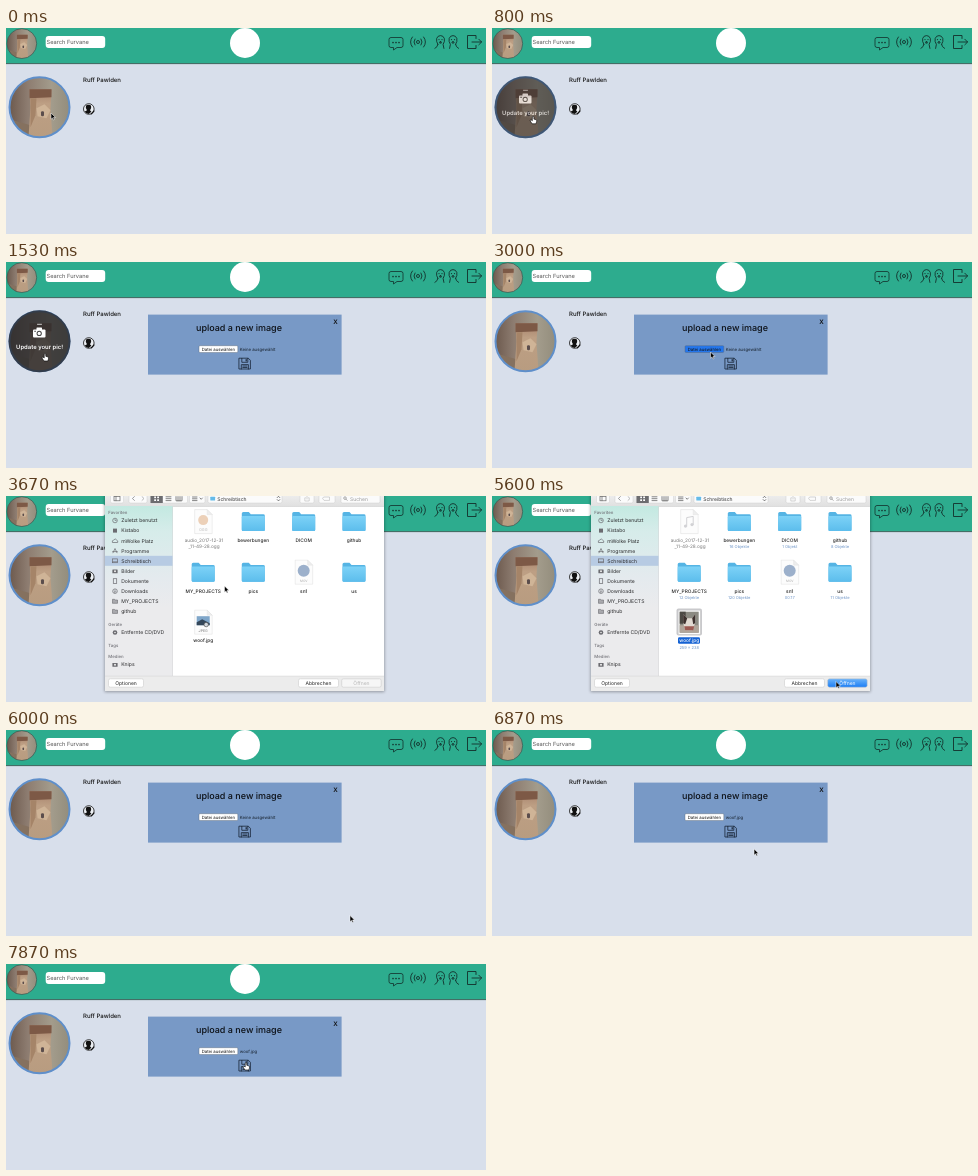
Animation of 480x206 px, one loop 8000 ms. Source, as an HTML page:

```html
<!DOCTYPE html>
<html lang="en">
<head>
<meta charset="utf-8">
<title>Picture upload</title>
<style>
html, body { margin: 0; width: 100%; height: 100%; overflow: hidden; background: #d8dfeb; }
svg { display: block; width: 100vw; height: 100vh; }
text { font-family: Inter, "Open Sans", sans-serif; text-rendering: geometricPrecision; white-space: pre; }
</style>
</head>
<body>
<svg id="stage" viewBox="0 0 480 206" preserveAspectRatio="none"></svg>
<script>
const LOOP = 8000;
const rect = (x, y, w, h, fill, extra = '') =>
  `<rect x="${x}" y="${y}" width="${w}" height="${h}" fill="${fill}" ${extra}/>`;
const circle = (x, y, r, fill, extra = '') =>
  `<circle cx="${x}" cy="${y}" r="${r}" fill="${fill}" ${extra}/>`;
const path = (d, fill, extra = '') => `<path d="${d}" fill="${fill}" ${extra}/>`;
const line = (d, color, w) =>
  path(d, 'none', `stroke="${color}" stroke-width="${w}" stroke-linecap="round" stroke-linejoin="round"`);
const label = (x, y, size, str, fill = '#111', extra = '') =>
  `<text x="${x}" y="${y}" font-size="${size}" fill="${fill}" ${extra}>${str}</text>`;
const mid = (x, y, size, str, fill, extra = '') =>
  label(x, y, size, str, fill, 'text-anchor="middle" ' + extra);
const group = (id, body, extra = '') => `<g id="${id}" ${extra}>${body}</g>`;
const at = (x, y, body, s = 1) => `<g transform="translate(${x} ${y}) scale(${s})">${body}</g>`;
const gradient = (id, stops, dir = 'x2="0" y2="1"') => `<linearGradient id="${id}" ${dir}>` +
  stops.map(([pos, color]) => `<stop offset="${pos}" stop-color="${color}"/>`).join('') + '</linearGradient>';

const INK = '#14302c';

const defs = '<defs>' +
  gradient('wall', [[0, '#6d5a4e'], [.3, '#8d7c70'], [.7, '#a39c8c'], [1, '#938d7c']], '') +
  gradient('bag', [[0, '#a5806a'], [.3, '#bd9f84'], [1, '#b89c80']]) +
  gradient('folder', [[0, '#7dd2f7'], [1, '#5cbdec']]) +
  gradient('bar', [[0, '#ececec'], [1, '#e0e0e0']]) +
  gradient('side', [[0, '#c3e9e1'], [.15, '#d6ecea'], [.42, '#e4eaee'], [.6, '#ebebed'], [1, '#ebebed']]) +
  gradient('blue', [[0, '#6bb3fa'], [1, '#1b7df5']]) + `
  <clipPath id="round"><circle r="30"/></clipPath>
  <filter id="soft" x="-10%" y="-10%" width="120%" height="120%"><feGaussianBlur stdDeviation="1.6"/></filter>
</defs>`;

// Avatar photo, drawn around its centre with radius 30
const photo = `<g clip-path="url(#round)">
  ${rect(-30, -30, 60, 60, 'url(#wall)')}
  ${path('M-30 12L-9 18V30H-30Z', '#85715f')}
  ${path('M-10 -18L12 -18L11 2L13 30L-11 30L-9 0Z', 'url(#bag)')}
  ${path('M-10 -18H12V-10L-10 -9Z', '#7d5946')}
  ${path('M-9 -9L-3 -9L-4 8L-9 20Z', '#a58468')}
  ${path('M-3 1L5 -3L11 3L7 11L-2 9Z', '#cfb497')}
  ${rect(1.5, 4, 3, 5, '#5b4d4c', 'rx="1.2"')}
</g>`;

const chat = path('M385 9.5H395Q397 9.5 397 11.5V17.5Q397 19.5 395 19.5H391L387.5 22V19.5H385Q383 19.5 383 17.5V11.5Q383 9.5 385 9.5Z',
  'none', `stroke="${INK}" stroke-width=".8"`) + [387, 390, 393].map(x => circle(x, 14.6, .8, INK)).join('');
const signal = circle(412, 14, 1.5, 'none', `stroke="${INK}" stroke-width=".9"`) +
  line('M409 11Q406.8 14 409 17M406.4 9Q402.6 14 406.4 19M415 11Q417.2 14 415 17M417.6 9Q421.4 14 417.6 19', INK, .9);
const pet = (x, flip) => `<g transform="translate(${x} 14) scale(${flip} 1)">` +
  line('M-2.6 2.4Q-4.6 -.6 -3.8 -3.6Q-2.8 -6.4 0 -6.4Q2.8 -6.4 3.8 -3.6Q4.6 -.6 2.6 2.4L3.4 6.4M-2.6 2.4Q-2.8 5 -5.6 6.4M-1.2 .8Q0 2 1.2 .8', INK, .9) +
  circle(-1.5, -2.4, .6, INK) + circle(1.5, -2.4, .6, INK) + circle(0, -.2, .9, INK) + '</g>';
const exit = line('M470 10.5V7.5H461.5V20.5H470V17.5M466 14H475.5M472.8 11.2L475.6 14L472.8 16.8', INK, .9);

const page = rect(0, 0, 480, 206, '#d8dfeb') +
  rect(0, 0, 480, 35.4, '#2dac8e') + rect(0, 35.2, 480, .9, '#31584f') +
  at(15.8, 15.6, photo, .49) + circle(15.8, 15.6, 14.9, 'none', 'stroke="#42544e" stroke-width=".7"') +
  rect(39.7, 7.9, 59.5, 12, '#fff', 'rx="3"') + label(40.6, 15.8, 5.7, 'Search Furvane', '#555') +
  circle(239, 15, 15, '#fff') +
  chat + signal + pet(434.5, 1) + pet(447, -1) + exit +
  at(33.5, 79.3, photo) + circle(33.5, 79.3, 30, 'none', 'stroke="#5f8fca" stroke-width="2"') +
  label(77, 54, 6, 'Ruff Pawlden', '#111', 'font-weight="500"') +
  circle(82.8, 81, 5.3, '#eef1f5', 'stroke="#111" stroke-width=".8"') +
  path('M80 77.6Q82.5 75.8 85 77.6Q85.8 80 84 82.2L85.4 83.8L82.6 86Q79.4 85.6 78.8 83.6L81 82.2Q79.2 80 80 77.6Z', '#111') +
  line('M85.2 86L88 83', '#111', 1.1);

const camera = rect(27, 67.5, 12.5, 8, '#fff', 'rx="1"') + rect(30.5, 65.5, 5.5, 3, '#fff', 'rx=".6"') +
  circle(33.2, 71.4, 2.6, '#444') + circle(33.2, 71.4, 1.6, '#fff') + rect(28.2, 68.8, 1.8, .9, '#444') +
  line('M31.5 62.3H35.5', '#ddd', .9);
const hover = group('hover', circle(33.5, 79.3, 31, '#28282b', 'opacity=".8"') + camera +
  mid(33.6, 87.4, 5.9, 'Update your pic!', '#fff', 'font-weight="600"'));

const disk = line('M233.3 96.2H242.3L244.4 98.3V107H233.3ZM235.8 96.4V100.3H241.8V96.4M235.3 107V102.6H242.4V107M236.8 104H241M236.8 105.5H241', '#182536', .8) +
  rect(239.6, 97.2, 1.2, 2.2, '#182536');
const modal = group('modal', rect(142, 52.6, 193.6, 60, '#7899c6') +
  mid(233, 69, 9, 'upload a new image', '#0c1016', 'font-weight="500"') +
  mid(329.6, 62.4, 6.2, 'X', '#111', 'font-weight="600"') +
  rect(193, 83.7, 38.8, 6.8, '#fff', 'id="pick" rx="1" stroke="#59636f" stroke-width=".4"') +
  mid(212.4, 88.7, 4.3, 'Datei auswählen', '#111') +
  label(233.7, 88.7, 4.3, '', '#16202c', 'id="chosen"') + disk);

// File dialog
const folder = path('M-11.5 -8Q-11.5 -9.5 -10 -9.5H-4.5L-2.5 -7.3H10Q11.5 -7.3 11.5 -6V8Q11.5 9.5 10 9.5H-10Q-11.5 9.5 -11.5 8Z', '#55b4e4') +
  rect(-11.5, -5.6, 23, 15.1, 'url(#folder)', 'rx="1.2"');
const sheet = path('M-8.5 -12H4L9 -7V12H-8.5Z', '#fcfcfc', 'stroke="#dcdcdc" stroke-width=".5"') +
  path('M4 -12V-7H9Z', '#eee', 'stroke="#dcdcdc" stroke-width=".4"');
const note = line('M-2.5 4.5V-4L4 -5.2V3', '#d2d2d5', 1) + circle(-3.7, 4.5, 1.6, '#d2d2d5') + circle(2.8, 3, 1.6, '#d2d2d5');
const ogg = circle(0, -1.5, 5, '#ecd0b8') + mid(0, 9.5, 3.8, 'OGG', '#b5b5b5');
const clip = sheet + circle(0, -1.5, 6, '#9cb0cb') + mid(0, 9.7, 3.2, 'MOV', '#aaa');
const jpeg = sheet + rect(-6.5, -6, 13, 9, '#7fa6c9') + path('M-6.5 3V0L-1 -3L6.5 1V3Z', '#34475a') +
  circle(3, 2.4, 2.2, '#d3d8de', 'stroke="#555" stroke-width=".7"') + mid(0, 10, 3.6, 'JPEG', '#777');
const thumb = rect(-11, -12, 22, 24, '#fff', 'stroke="#c9c9c9" stroke-width=".5"') + rect(-9.5, -10.5, 19, 21, '#8b8a82') +
  rect(-9.5, -10.5, 6, 12, '#4d4a45') + rect(-9.5, 3, 19, 7.5, '#b0a59a') +
  path('M-6 -8L-2 -4H3L6 -8L6 1L3 8H-4L-6 1Z', '#e2dad2') +
  path('M-6 -8L-2 -4L-4 2L-6 1ZM6 -8L3 -4L4 2L6 1Z', '#3d312e') + path('M-5 4H5L4 8H-4Z', '#9c5a52');

const cols = [197.2, 247.3, 297.7, 348];
const files = [
  [1, 0, 'bewerbungen', '16 Objekte'], [2, 0, 'DICOM', '1 Objekt'], [3, 0, 'github', '8 Objekte'],
  [0, 1, 'MY_PROJECTS', '12 Objekte'], [1, 1, 'pics', '120 Objekte'], [2, 1, 'sn1', '00:17'], [3, 1, 'us', '11 Objekte']
];
const rowY = r => 25.6 + r * 50.6;
const icons = files.map(([c, r, name]) => at(cols[c], rowY(r), name === 'sn1' ? clip : folder) +
  mid(cols[c], rowY(r) + 20.3, 4.8, name, '#222', 'font-weight="500"')).join('');
const details = group('details', files.map(([c, r, , info]) =>
  mid(cols[c], rowY(r) + 26.3, 4, info, '#6b93c6')).join('') + mid(cols[0], 152.6, 4, '259 × 238', '#6b93c6'));

const places = ['Zuletzt benutzt', 'Kistabo', 'mWolke Platz', 'Programme', 'Schreibtisch', 'Bilder', 'Dokumente',
  'Downloads', 'MY_PROJECTS', 'github'];
const GREY = '#6b6b70';
const glyphs = [
  circle(0, 0, 2.3, 'none', `stroke="${GREY}" stroke-width=".7"`) + line('M0 -1.3V0H1.2', GREY, .6),
  rect(-2, -2, 4, 4, GREY),
  path('M-2.6 1.8Q-3.3 -.4 -1.3 -.6Q.2 -3 1.7 -.6Q3.4 0 2.6 1.8Z', 'none', `stroke="${GREY}" stroke-width=".7"`),
  line('M-2 2L0 -2.3L2 2M-2.4 .8H2.4', GREY, .7),
  rect(-2.5, -2, 5, 3.8, 'none', `stroke="${GREY}" stroke-width=".7"`) + line('M-2.3 .9H2.3', GREY, .7),
  rect(-2.6, -1.6, 5.2, 3.8, GREY, 'rx=".5"') + circle(0, .3, 1, '#eee'),
  rect(-1.7, -2.4, 3.4, 4.8, 'none', `stroke="${GREY}" stroke-width=".7"`),
  circle(0, 0, 2.3, 'none', `stroke="${GREY}" stroke-width=".7"`) + line('M0 -1.2V1.1M-.9 .3L0 1.2L.9 .3', GREY, .6),
  path('M-2.5 -2H-.5L.2 -1.3H2.5V2H-2.5Z', '#a9a9ad', `stroke="${GREY}" stroke-width=".6"`)
];
const place = (y, name, icon) => at(109, y, icon) + label(115.2, y + 1.8, 5.1, name, '#2a2a2c');
const heading = (y, name) => label(102.3, y + 1.6, 4.3, name, '#707076', 'font-weight="500"');
const sidebar = rect(99, 10, 68, 170, 'url(#side)') + rect(166.5, 10, .5, 170, '#d4d4d7') + rect(99, 59.8, 67.5, 10, '#b7cbe3') +
  heading(16, 'Favoriten') + places.map((name, i) => place(24.5 + i * 10.1, name, glyphs[Math.min(i, 8)])).join('') +
  heading(128, 'Geräte') + place(136.5, 'Entfernte CD/DVD', circle(0, 0, 2.3, GREY) + circle(0, 0, .8, '#eee')) +
  heading(149, 'Tags') + heading(160, 'Medien') + place(168.5, 'Knips', glyphs[5]);

const button = (x, w, name, fill, extra = '') => rect(x, 182.8, w, 8.4, '#fff', `rx="1.8" stroke="#c4c4c4" stroke-width=".5" ${extra}`) +
  mid(x + w / 2, 188.8, 5, name, fill, extra && 'id="openText"');
const pill = (x, w) => rect(x, -3, w, 10, '#fbfbfb', 'rx="1.5" stroke="#c8c8c8" stroke-width=".4"');
const tile = x => rect(x, .5, 1.8, 1.7, '#fff') + rect(x, 3.3, 1.8, 1.7, '#fff');
const toolbar = rect(99, 0, 279, 10.5, 'url(#bar)') + rect(99, 10.1, 279, .5, '#c8c8c8') +
  pill(104.5, 13) + rect(108, .4, 6, 4.4, 'none', 'stroke="#666" stroke-width=".7"') + line('M110 .5V4.7', '#666', .7) +
  pill(123, 18) + line('M128.4 .6L126.4 2.5L128.4 4.4', '#888', .8) + line('M136 .6L138 2.5L136 4.4', '#aaa', .8) +
  pill(144.5, 37) + rect(144.5, 0, 12.3, 7, '#6c6c6f') + tile(148.2) + tile(151.2) +
  line('M160 .8H165M160 2.7H165M160 4.6H165M170 .6V4.8H176V.6M172 .6V4.8M174 .6V4.8', '#666', .8) +
  pill(183.5, 15.5) + line('M186.5 1H191M186.5 2.8H191M186.5 4.6H191M194 2L195.2 3.3L196.4 2', '#666', .8) +
  pill(202, 74) + rect(204.3, .8, 4.8, 3.8, '#65bbe8', 'rx=".5"') +
  label(211.2, 4.6, 5, 'Schreibtisch', '#333') + line('M271.2 1.6L272.5 .3L273.8 1.6M271.2 3.6L272.5 4.9L273.8 3.6', '#444', .7) +
  pill(294, 14) + line('M299.5 1.8H298.8V5H303.2V1.8H302.5M301 3V-.4', '#bbb', .6) +
  pill(313, 16) + line('M318 1H323.5V4.4H318L316.8 2.7Z', '#bbb', .6) +
  pill(335, 39) + circle(339, 2.1, 1.3, 'none', 'stroke="#777" stroke-width=".6"') + line('M340 3.2L341.2 4.4', '#777', .6) +
  label(344, 4.6, 5, 'Suchen', '#999');

const dialog = group('dialog', rect(98.5, -5, 280, 201, '#000', 'opacity=".32" filter="url(#soft)"') +
  rect(99, 0, 279, 195, '#fff') + toolbar + sidebar +
  at(cols[0], 25.6, sheet + group('ogg', ogg) + group('note', note)) +
  mid(198, 45.8, 4.7, 'audio_2017-12-31', '#777') + mid(198, 51.8, 4.7, '_11-49-28.ogg', '#777') +
  icons + details +
  rect(184.5, 112.5, 25.5, 27, '#c9c9cc', 'id="halo" rx="2"') +
  at(cols[0], 126.2, group('jpeg', jpeg) + group('thumb', thumb)) +
  rect(186, 141.2, 22, 6.6, '#1462d4', 'id="mark" rx="1.4"') +
  mid(cols[0], 146.3, 4.8, 'woof.jpg', '#222', 'id="woof" font-weight="500"') +
  rect(99, 180, 279, 15, '#ececec') + rect(99, 179.8, 279, .5, '#d2d2d2') +
  button(102.5, 35, 'Optionen', '#222') + button(292.5, 40, 'Abbrechen', '#222') + button(335.7, 39.5, 'Öffnen', '#b5b5b5', 'id="open"'));

const arrow = group('arrow', path('M0 0V6.2L1.5 4.9L2.5 7L3.5 6.5L2.5 4.5H4.5Z', '#000', 'stroke="#fff" stroke-width=".5"'));
const hand = group('hand', path('M-.8 -2Q0 -3 .8 -2V.3L3.2 1Q3.8 1.4 3.5 3L2.8 5H-1L-3 2Q-3 .8 -1.8 1.2L-.8 2Z', '#fff', 'stroke="#000" stroke-width=".6"'));

const stage = document.getElementById('stage');
stage.innerHTML = defs + page + hover + modal + dialog + group('cursor', arrow + hand);
const el = id => document.getElementById(id);
const show = (id, on) => el(id).setAttribute('visibility', on ? 'inherit' : 'hidden');
const set = (id, key, value) => el(id).setAttribute(key, value);

// Pointer stops: time, x, y
const route = [
  [400, 45, 85], [1070, 39, 94], [1860, 39, 94], [2070, 247, 100], [2200, 247, 100], [2470, 222, 89], [2670, 218.5, 90],
  [4000, 218.5, 90], [4500, 198, 127], [5260, 198, 127], [5600, 344, 185.5], [6400, 344, 185.5], [7070, 240, 101]
];
const clamp = v => Math.min(1, Math.max(0, v));
const ease = u => u * u * (3 - 2 * u);
const ramp = (t, a, b) => clamp((t - a) / (b - a));

function pointer(t) {
  let [, x, y] = route[0];
  for (let i = 1; i < route.length; i++) {
    const [a, x0, y0] = route[i - 1], [b, x1, y1] = route[i];
    if (t < a) break;
    const u = ease(ramp(t, a, b));
    x = x0 + (x1 - x0) * u;
    y = y0 + (y1 - y0) * u;
  }
  return [x, y];
}

function draw(t) {
  const within = (a, b) => t >= a && t < b;
  const [x, y] = pointer(t);
  const pointing = within(600, 1930) || t >= 7330;
  set('cursor', 'transform', `translate(${x.toFixed(2)} ${y.toFixed(2)})`);
  show('arrow', !pointing);
  show('hand', pointing);
  set('hover', 'opacity', ease(ramp(t, 360, 1070)) * (1 - ramp(t, 1890, 2070)));

  show('modal', t >= 1530);
  set('pick', 'fill', within(2670, 6000) ? '#2476ec' : '#fff');
  el('chosen').textContent = t < 6200 ? 'Keine ausgewählt' : 'woof.jpg';

  const open = within(3670, 6000);
  const loaded = t >= 3730, preview = t >= 3800, picked = t >= 4530, ready = t >= 4870;
  show('dialog', open);
  show('details', open && loaded);
  show('ogg', open && !loaded);
  show('note', open && loaded);
  show('jpeg', open && !preview);
  show('thumb', open && preview);
  show('halo', open && picked);
  show('mark', open && picked);
  set('woof', 'fill', picked ? '#fff' : '#222');
  set('open', 'fill', t >= 5800 ? '#0d5fcb' : ready ? 'url(#blue)' : '#f6f6f6');
  set('openText', 'fill', ready ? '#fff' : '#b5b5b5');
}

const start = performance.now();
function tick() {
  draw((performance.now() - start) % LOOP);
  requestAnimationFrame(tick);
}
draw(0);
requestAnimationFrame(tick);
</script>
</body>
</html>
```
